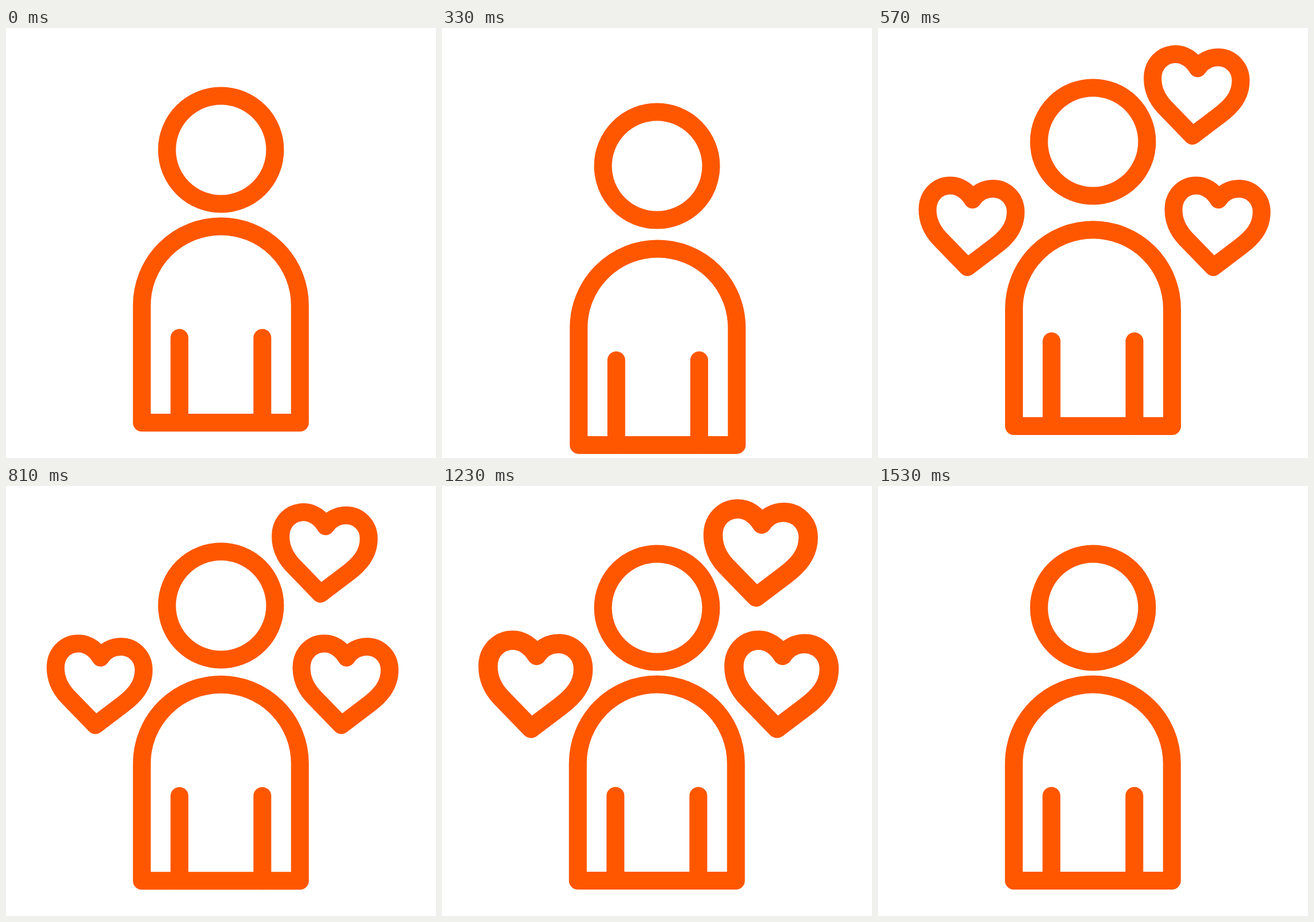
Recreate the animation shown at these times as an HTML page. Size 748x748 px, loop 1950 ms.

```html
<!DOCTYPE html>
<html lang="en">
<head>
<meta charset="utf-8">
<title>Person with hearts</title>
<style>
  html, body { margin: 0; width: 100%; height: 100%; overflow: hidden; background: #fff; }
  svg { display: block; width: 100%; height: 100%; }
</style>
</head>
<body>
<svg viewBox="0 0 748 748" fill="none" stroke="#ff5700" stroke-width="31" stroke-linecap="round" stroke-linejoin="round">
  <defs>
    <path id="heart" transform="translate(-163 -345)" d="M164.5 298.5C156 284 142 274 126 274C103 274 86.2 292 86.2 316C86.2 336 94 352 107 366L155.5 416L203 380C222 365.5 239.5 348 239.5 320C239.5 297 222 279.5 200 279.5C185 279.5 172 287 164.5 298.5Z"/>
  </defs>
  <g id="body">
    <path d="M236.3 686.5V482.5A137.5 137.5 0 0 1 511.3 482.5V686.5Z"/>
    <path d="M301.7 539V686.5M445.9 539V686.5"/>
  </g>
  <circle id="head" cx="374" cy="212" r="94"/>
  <g id="hearts">
    <use href="#heart" x="163" y="345"/>
    <use href="#heart" x="590.8" y="345"/>
    <use href="#heart" x="554.5" y="116.5"/>
  </g>
</svg>
<script>
const LOOP = 1950, STEP = 30;
const CROUCH = 300, TOP = 480, SETTLED = 1080;   // body and head timing
const POP = 500, BEAT = 570, GONE = 1530;        // heart timing
const $ = id => document.getElementById(id);
const body = $('body'), head = $('head');
const hearts = [...$('hearts').children];
const spots = hearts.map(h => [h.getAttribute('x'), h.getAttribute('y')]);
hearts.forEach(h => { h.removeAttribute('x'); h.removeAttribute('y'); });

const part = (t, a, b) => Math.min(1, Math.max(0, (t - a) / (b - a)));
const ease = u => (1 - Math.cos(Math.PI * u)) / 2;
const cubic = u => u < 0.5 ? 4 * u ** 3 : 1 - 4 * (1 - u) ** 3;

// Sinks, then rises softly back to rest
function bodyDrop(t) {
  if (t < CROUCH) return 41.2 * ease(t / CROUCH);
  return t < SETTLED ? 41.2 * Math.exp(-(((t - CROUCH) / 179) ** 1.6)) : 0;
}

// Sinks, springs above rest, then settles
function headDrop(t) {
  const low = 29, high = -19.5;
  if (t < CROUCH) return low * ease(t / CROUCH);
  if (t < TOP) return low + (high - low) * cubic(part(t, CROUCH, TOP));
  return high * (1 - part(t, TOP, SETTLED)) ** 2;
}

// Pops in, then beats as a triangle wave
function heartScale(t) {
  if (t >= GONE) return 0;
  if (t < BEAT) return part(t, POP, BEAT);
  const phase = 2 * Math.PI * (t - BEAT) / 480;
  return 1 + 0.16 * Math.asin(Math.sin(phase)) / (Math.PI / 2);
}

function draw(ms) {
  const t = Math.floor((ms % LOOP) / STEP) * STEP;
  const drop = bodyDrop(t), scale = heartScale(t);
  body.setAttribute('transform', `translate(${drop * 0.038} ${drop})`);
  head.setAttribute('cy', 212 + headDrop(t));
  hearts.forEach((heart, i) => {
    heart.style.display = scale ? '' : 'none';
    heart.setAttribute('transform', `translate(${spots[i]}) scale(${scale})`);
  });
}

const start = performance.now();
function tick() {
  draw(performance.now() - start);
  requestAnimationFrame(tick);
}
tick();
</script>
</body>
</html>
```
